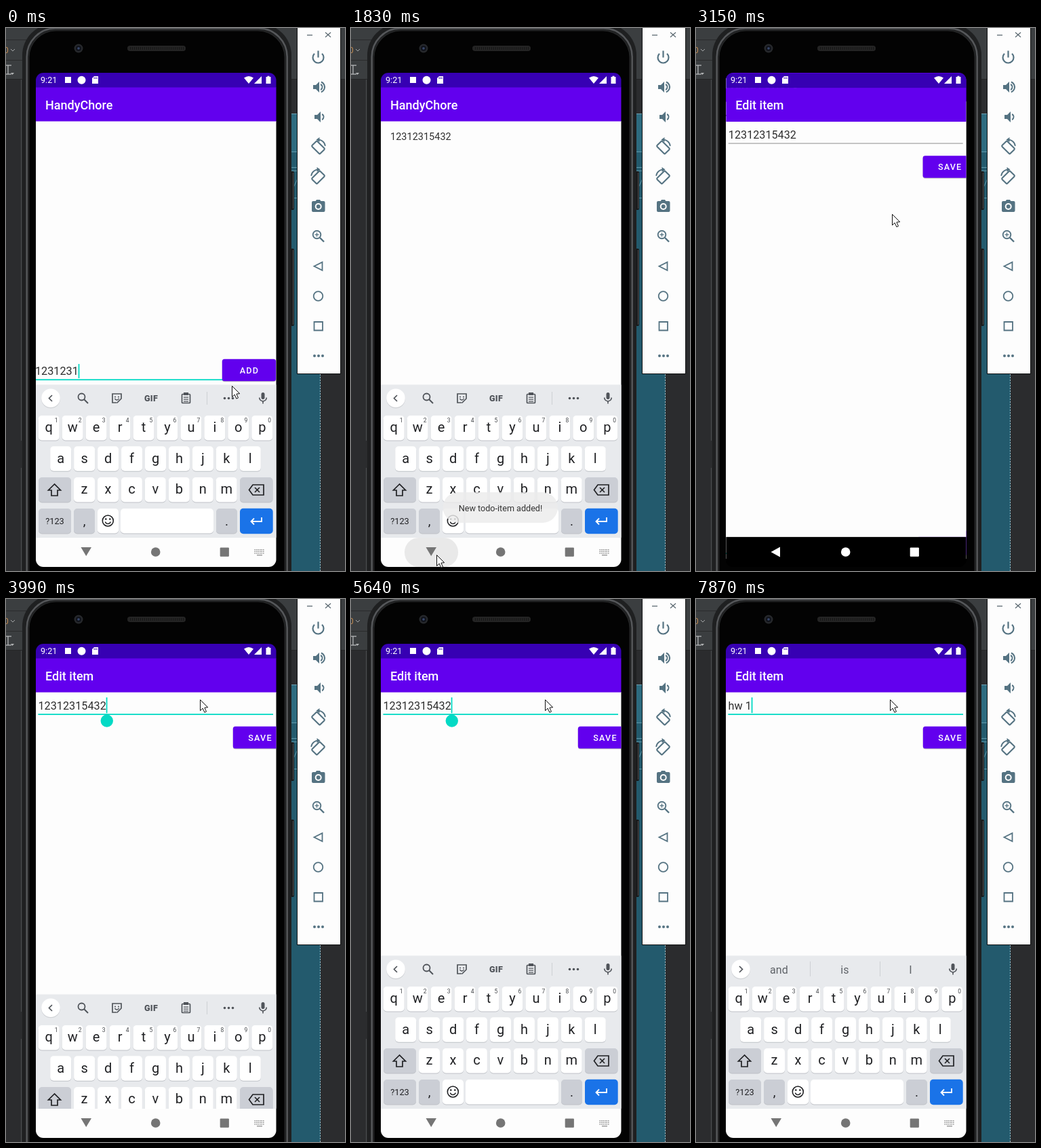
Recreate the animation shown at these times as an HTML page with a canvas. Size 500x800 px, loop 8000 ms.

```html
<!DOCTYPE html>
<html lang="en">
<head>
<meta charset="utf-8">
<title>To-do app demo</title>
<style>
html, body { margin: 0; width: 100%; height: 100%; overflow: hidden; background: #2b2b2b; }
canvas { display: block; }
</style>
</head>
<body>
<canvas id="stage" width="500" height="800"></canvas>
<script>
const ctx = document.getElementById('stage').getContext('2d');
const LOOP = 8000, TICK = 132;
const PURPLE = '#6200ee', TEAL = '#03dac5', SLATE = '#557382', KEY_INK = '#202124', ICON = '#50545a';
const SP = 354 / 1080 * 2.75; // stage pixels per Android sp
const FULL = '12312315432';

const clamp = v => Math.max(0, Math.min(1, v));
const span = (t, a, b) => clamp((t - a) / (b - a));

function rect(x, y, w, h, color) {
  ctx.fillStyle = color;
  ctx.fillRect(x, y, w, h);
}
function round(x, y, w, h, r, color) {
  ctx.beginPath();
  ctx.roundRect(x, y, w, h, r);
  ctx.fillStyle = color;
  ctx.fill();
}
function frame(x, y, w, h, r, color, width = 1) {
  ctx.beginPath();
  ctx.roundRect(x, y, w, h, r);
  ctx.strokeStyle = color;
  ctx.lineWidth = width;
  ctx.stroke();
}
function disc(x, y, r, color) {
  ctx.beginPath();
  ctx.arc(x, y, r, 0, 7);
  ctx.fillStyle = color;
  ctx.fill();
}
function arc(x, y, r, a, b, color, width) {
  ctx.beginPath();
  ctx.arc(x, y, r, a, b);
  ctx.strokeStyle = color;
  ctx.lineWidth = width;
  ctx.stroke();
}
const ring = (x, y, r, color, width) => arc(x, y, r, 0, 2 * Math.PI, color, width);
function trace(pts, close) {
  ctx.beginPath();
  for (let i = 0; i < pts.length; i += 2) ctx.lineTo(pts[i], pts[i + 1]);
  if (close) ctx.closePath();
}
function poly(pts, color) {
  trace(pts, true);
  ctx.fillStyle = color;
  ctx.fill();
}
function line(pts, color, width = 1, close = false) {
  trace(pts, close);
  ctx.strokeStyle = color;
  ctx.lineWidth = width;
  ctx.stroke();
}
function text(str, x, y, size, color, { weight = 400, align = 'left', gap = 0 } = {}) {
  ctx.font = `${weight} ${size}px Roboto, sans-serif`;
  ctx.textAlign = align;
  ctx.letterSpacing = gap + 'px';
  ctx.fillStyle = color;
  ctx.fillText(str, x, y);
  return ctx.measureText(str).width;
}
function at(x, y, draw, angle = 0) {
  ctx.save();
  ctx.translate(x, y);
  ctx.rotate(angle);
  draw();
  ctx.restore();
}

function desktop() {
  rect(0, 0, 500, 800, '#2b2c2e');
  rect(0, 0, 500, 75, '#3b3e40');
  rect(0, 17, 30, 1, '#2a2b2c');
  rect(0, 47, 30, 1, '#2a2b2c');
  rect(0, 75, 500, 1, '#242526');
  text('0', -3, 37, 12, '#c08a52');
  line([7, 31, 10, 34, 13, 31], '#a5a7a8');
  line([0, 55, 8, 55], '#b5b7b8', 1.3);
  line([3, 55, 3, 68], '#b5b7b8', 1.3);
  line([0, 68, 8, 68], '#b5b7b8', 1.3);
  poly([7, 66, 12, 66, 9.5, 69], '#b5b7b8');
  rect(22, 76, 1, 532, '#4b4d4f');
  rect(22, 648, 1, 152, '#4b4d4f');
  rect(420, 126, 44, 674, '#235a6d');
  rect(420, 126, 44, 1, '#6d9fb0');
  rect(420, 127, 44, 55, '#2d6b7f');
  for (const y of [182, 205, 210, 250]) rect(420, y, 12, 1, '#5f97a9');
  line([424, 235, 430, 222], '#5f97a9');
  ctx.setLineDash([2, 2]);
  line([463.5, 126, 463.5, 800], '#a9bcc4');
  ctx.setLineDash([]);
}

function body() {
  round(419, 211, 6, 57, 2, '#18191a');
  round(419, 325, 6, 114, 2, '#18191a');
  rect(423, 213, 1, 53, '#555');
  rect(423, 327, 1, 110, '#555');
  round(24, -6, 397, 900, 46, '#1f2021');
  frame(30.7, .5, 384, 880, 42, '#55575a', 2.5);
  round(33, 3, 379, 880, 40, '#242526');
  round(34.5, 4.5, 376, 880, 39, '#030303');
  disc(107, 30, 6.5, '#27292c');
  disc(107, 30, 4, '#10131b');
  disc(107, 30, 1.8, '#39476b');
  round(179, 26, 86, 8, 4, '#242424');
  for (let x = 183; x < 262; x += 3) rect(x, 28, 1, 4, '#151515');
}

function statusIcons() {
  text('9:21', 51, 81.3, 14 * SP, '#fff');
  rect(87, 72, 9, 9, '#fff');
  disc(111.5, 76.7, 6, '#fff');
  poly([130, 71, 136, 71, 136, 82, 127, 82, 127, 74], '#fff');
  for (const x of [130, 132, 134]) rect(x - .4, 72.5, .9, 2.5, '#3700b3');
  ctx.beginPath();
  ctx.moveTo(358, 82);
  ctx.lineTo(351, 73.5);
  ctx.quadraticCurveTo(358, 68.5, 365, 73.5);
  ctx.fillStyle = '#fff';
  ctx.fill();
  poly([366, 82, 377, 82, 377, 71], '#fff');
  rect(383.5, 72, 7, 10, '#fff');
  rect(385.5, 70.7, 3, 2, '#fff');
}

function button(label, x, y) {
  const w = 88 * SP, h = 36 * SP;
  round(x, y + 1, w, h, 3.5, 'rgba(0,0,0,.25)');
  round(x, y, w, h, 3.5, PURPLE);
  text(label, x + w / 2 + .5, y + 20.9, 14 * SP, '#fff', { weight: 500, align: 'center', gap: 1.13 });
}

function page(title) {
  rect(44, 66, 355, 22, '#3700b3');
  rect(44, 137, 355, 613.5, '#fdfdfd');
  rect(44, 87.5, 355, 50, PURPLE);
  rect(44, 750.5, 355, 50, '#000');
  text(title, 58, 119.8, 20 * SP, '#fff', { weight: 500 });
}

function listPage(k) {
  page('HandyChore');
  const added = k >= 7;
  if (added) text(FULL, 58, 165, 16 * SP, '#2e2e2e', { gap: .06 });
  const y = k >= 14 ? 225 : 0;
  const typed = added ? '' : FULL.slice(0, 7 + Math.min(4, k));
  const w = typed ? text(typed, 43, 511.3 + y, 18 * SP, '#2e2e2e') : 1;
  if (!typed) text('Ex. HW1', 43, 511.3 + y, 18 * SP, '#999');
  rect(44, 517.3 + y, 276, 1.8, TEAL);
  rect(42.8 + w, 495 + y, 1.8, 21, TEAL);
  button('ADD', 318.8, 487.8 + y);
}

function editText(t) {
  if (t >= 7480) return 'hw 1'.slice(0, 1 + Math.floor((t - 7480) / 130));
  const cuts = [[6950, 0], [6810, 2], [6680, 5], [6530, 8], [6410, 9], [6160, 10]];
  const cut = cuts.find(c => t >= c[0]);
  return cut ? FULL.slice(0, cut[1]) : FULL;
}

function editPage(t) {
  page('Edit item');
  const focus = t >= 3660;
  const w = text(editText(t), 47.5, 162.7, 18 * SP, '#2e2e2e');
  if (focus) {
    rect(47.4, 169, 346.6, 1.8, TEAL);
    const hidden = (t >= 4260 && t < 4690) || (t >= 5110 && t < 5640);
    if (!hidden) rect(47.4 + w, 145, 1.8, 23, TEAL);
    if (t < 6160) {
      disc(48.5 + w, 179.5, 9.2, TEAL);
      poly([48.5 + w, 168.5, 43 + w, 173, 54 + w, 173], TEAL);
    }
  } else {
    rect(47.4, 169, 346.6, 1, '#8c8c8c');
  }
  button('SAVE', 334.8, 187.8);
}

function scaled(s, alpha, draw) {
  ctx.save();
  ctx.globalAlpha = alpha;
  ctx.translate(221, 430);
  ctx.scale(s, s);
  ctx.translate(-221, -430);
  draw();
  ctx.restore();
}

function key(x, y, w, color) {
  round(x, y + 1, w, 36.5, 5, '#bfc2c7');
  round(x, y, w, 36.5, 5, color);
}

function keyRow(chars, x, y, digits) {
  [...chars].forEach((c, i) => {
    const cx = x + i * 34.95;
    key(cx - 15.5, y, 31, '#fff');
    text(c, cx, y + 24.3, 20, KEY_INK, { align: 'center' });
    if (digits) text((i + 1) % 10, cx + 11, y + 10, 8.5, '#44474b', { align: 'center' });
  });
}

function toolStrip() {
  ring(111.5, 543.5, 5, ICON, 1.8);
  line([115, 547, 121, 553], ICON, 2);
  line([163, 552, 157, 552, 157, 539, 170, 539, 170, 546, 163.5, 552.5], ICON, 1.7);
  disc(161, 543.5, 1, ICON);
  disc(166, 543.5, 1, ICON);
  arc(163.5, 545, 3, .2, 2.9, ICON, 1.4);
  text('GIF', 214, 549.8, 12.5, ICON, { weight: 900, align: 'center', gap: .3 });
  frame(259.5, 539.5, 12, 13, 1, ICON, 1.7);
  rect(262, 537, 7, 4, ICON);
  for (const y of [544, 547, 550]) rect(262, y - .5, 7, 1.2, ICON);
  rect(296, 536, 1, 19, '#cdd0d4');
  for (const x of [322.5, 328.5, 334.5]) disc(x, 545.5, 1.8, ICON);
}

function suggestions() {
  [['and', 122.5], ['is', 219.5], ['I', 316.5]].forEach(([w, x]) =>
    text(w, x, 551.8, 16, '#5f6368', { align: 'center', gap: .2 }));
  rect(168, 534, 1, 22, '#cdd0d4');
  rect(271, 534, 1, 22, '#cdd0d4');
}

function keyboard(predict) {
  rect(44, 525.5, 355, 226, '#e8eaed');
  disc(66, 546.3, 14, '#d0d2d6');
  disc(66, 545.3, 13.8, '#fff');
  const d = predict ? -1 : 1;
  line([66 + 2 * d, 541, 66 - 2.5 * d, 545.5, 66 + 2 * d, 550], ICON, 1.7);
  predict ? suggestions() : toolStrip();
  round(376.5, 537, 5, 10, 2.5, ICON);
  arc(379, 544.5, 5.3, 0, Math.PI, ICON, 1.6);
  rect(378.2, 549.5, 1.6, 4, ICON);

  keyRow('qwertyuiop', 63.2, 571, true);
  keyRow('asdfghjkl', 80.7, 616.3);
  keyRow('zxcvbnm', 115.5, 662);
  const grey = '#cbced5';
  key(48, 662, 48, grey);
  key(345, 662, 48.5, grey);
  line([71.5, 672, 62.5, 681, 67, 681, 67, 689, 76, 689, 76, 681, 80.5, 681], KEY_INK, 1.7, true);
  line([364, 673, 380, 673, 380, 688, 364, 688, 358.5, 680.5], KEY_INK, 1.7, true);
  line([367, 677, 374, 684], KEY_INK, 1.6);
  line([374, 677, 367, 684], KEY_INK, 1.6);

  key(48, 708, 48, grey);
  text('?123', 72, 731, 12.8, KEY_INK, { align: 'center' });
  key(100, 708, 31, grey);
  text(',', 115.5, 733, 19, KEY_INK, { align: 'center' });
  key(135, 708, 31, '#fff');
  ring(150.3, 726, 8, KEY_INK, 1.6);
  disc(147.3, 723.5, 1.3, KEY_INK);
  disc(153.3, 723.5, 1.3, KEY_INK);
  arc(150.3, 726.5, 4, .25, 2.9, KEY_INK, 1.5);
  key(169, 708, 137, '#fff');
  key(310, 708, 31, grey);
  text('.', 325.5, 733, 19, KEY_INK, { align: 'center' });
  round(345, 707.7, 48.7, 37.6, 5, '#1a73e8');
  line([377, 721, 377, 727, 362, 727], '#fff', 1.8);
  line([366, 722.5, 361.5, 727, 366, 731.5], '#fff', 1.8);
}

function navBar(light, pressed) {
  const c = light ? '#757575' : '#fff';
  if (light) rect(44, 750.5, 355, 49, '#fdfdfd');
  if (pressed) round(79, 751, 79, 43, 21, '#e9e9e9');
  poly(light ? [110.5, 765, 126, 765, 118.2, 778] : [110.5, 772, 124, 764.5, 124, 779.5], c);
  disc(220.7, 772, 6.8, c);
  round(315.7, 765.5, 13.2, 13.2, 1, c);
  if (!light) return;
  for (let r = 0; r < 3; r++)
    for (let i = 0; i < 6; i++) rect(366.5 + i * 2.5, 768 + r * 2.6, 1.5, 1.4, '#8a8a8a');
  rect(370, 776, 8, 1.2, '#8a8a8a');
}

function toast(alpha) {
  ctx.globalAlpha = alpha;
  round(135.5, 684, 169.5, 45, 22.5, 'rgba(236,236,236,.82)');
  text('New todo-item added!', 220.5, 711.5, 14 * SP, '#333', { align: 'center' });
  ctx.globalAlpha = 1;
}

function speaker(y, loud) {
  poly([453, y - 3, 457, y - 3, 462, y - 8, 462, y + 8, 457, y + 3, 453, y + 3], SLATE);
  arc(462, y, 4.5, -1.1, 1.1, SLATE, 2);
  if (loud) arc(462, y, 8, -1.2, 1.2, SLATE, 2);
}

// Tilted phone with a curved arrow over its upper shoulder; side -1 mirrors it
function rotateIcon(y, side) {
  at(460.5, y, () => {
    ctx.scale(side, 1);
    at(0, 1, () => frame(-5.5, -8.5, 11, 17, 1.5, SLATE, 2.1), -Math.PI / 4);
    arc(0, 0, 10.4, -1.7, -.1, SLATE, 1.8);
    poly([-3, -10.5, 2, -14, 2, -7], SLATE);
  });
}

function sidePanel() {
  rect(429, -1, 65, 511, '#101112');
  rect(430, 0, 63, 509, '#fdfdfd');
  line([444, 10.5, 452, 10.5], '#5d6b73', 1.3);
  line([471, 6.5, 479, 13.5], '#5d6b73', 1.3);
  line([479, 6.5, 471, 13.5], '#5d6b73', 1.3);
  arc(460.5, 43.5, 8, -.8, Math.PI + .8, SLATE, 2.2);
  rect(459.4, 33.5, 2.2, 10, SLATE);
  speaker(87, true);
  at(2, 0, () => speaker(131, false));
  rotateIcon(175, 1);
  rotateIcon(219, -1);
  round(451, 255, 19.5, 16, 2, SLATE);
  poly([456, 256, 458, 253, 463, 253, 465, 256], SLATE);
  disc(460.7, 263, 5, '#fdfdfd');
  disc(460.7, 263, 3, SLATE);
  ring(458.5, 304.5, 5.8, SLATE, 1.9);
  line([463, 309, 469, 315], SLATE, 2.4);
  line([455.5, 304.5, 461.5, 304.5], SLATE, 1.3);
  line([458.5, 301.5, 458.5, 307.5], SLATE, 1.3);
  line([466.5, 345, 466.5, 357, 454.5, 351], SLATE, 1.8, true);
  ring(460.5, 395, 6.8, SLATE, 1.8);
  frame(454.5, 433, 12.5, 12.5, 0, SLATE, 1.8);
  for (const x of [455, 461, 467]) disc(x, 483, 2, SLATE);
}

// Pointer stops: tick, x, y
const PATH = [
  [0, 333, 527], [4, 333, 527], [5, 350, 507], [8, 350, 507], [11, 230, 660],
  [13, 126, 776], [15, 126, 776], [16, 148, 520], [17, 166, 219], [18, 167, 174],
  [19, 165, 168], [21, 165, 168], [23, 270, 258], [24, 289, 274], [25, 289, 274],
  [26, 288, 210], [27, 286, 148], [99, 286, 148]
];
function pointer(k) {
  const i = PATH.findIndex(p => p[0] > k);
  const [a, ax, ay] = PATH[i - 1], [b, bx, by] = PATH[i];
  const p = (k - a) / (b - a);
  at(Math.round(ax + (bx - ax) * p) + .5, Math.round(ay + (by - ay) * p) + .5, () => {
    const arrow = [0, 0, 0, 16, 3.7, 12.6, 6.4, 18.6, 9, 17.4, 6.4, 11.6, 11.2, 11.2];
    poly(arrow, '#fff');
    line(arrow, '#111', 1, true);
  });
}

function keyboardLevel(k) {
  if (k < 15) return 1;
  if (k < 28) return 1 - span(k, 14, 17) ** 1.3;
  return 1 - (1 - span(k, 28, 32)) ** 2;
}

function draw(t) {
  const k = Math.min(60, Math.floor((t + 36) / TICK));
  desktop();
  body();

  ctx.save();
  ctx.beginPath();
  ctx.roundRect(44, 66, 354.5, 728, 11);
  ctx.clip();
  const open = span(k * TICK, 2680, 3300);
  const rest = (1 - open) ** 2.8;
  if (open < 1) scaled(1 + .1 * (1 - rest), 1, () => listPage(k));
  if (open > 0) scaled(1 - .15 * rest, span(open, 0, .25), () => editPage(t));
  statusIcons();

  const level = keyboardLevel(k);
  navBar(level > .4, k === 14 || k === 15);
  if (level > 0) {
    ctx.save();
    ctx.beginPath();
    ctx.rect(44, 500, 355, 251);
    ctx.clip();
    ctx.translate(0, Math.round((1 - level) * 226));
    keyboard(t >= 7740);
    ctx.restore();
  }
  if (k >= 8 && k < 23) toast(k === 8 || k === 22 ? .5 : 1);
  ctx.restore();

  sidePanel();
  pointer(k);
}

const start = performance.now();
function loop() {
  draw((performance.now() - start) % LOOP);
  requestAnimationFrame(loop);
}
loop();
</script>
</body>
</html>
```
